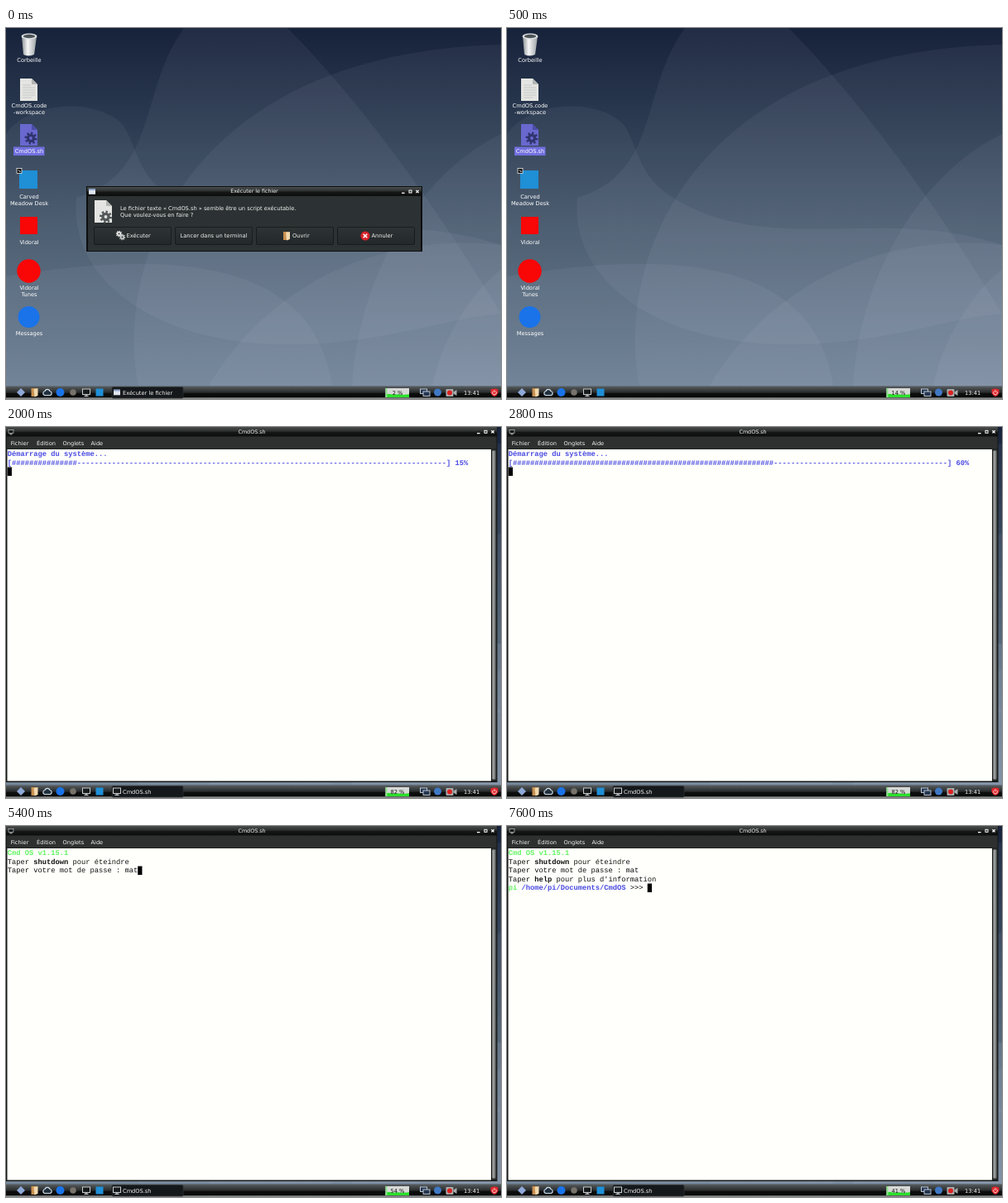
These frames come from a looping animation (598 px wide and 448 px high, 8000 ms). An HTML page:

```html
<!DOCTYPE html>
<html lang="fr">
<head>
<meta charset="utf-8">
<title>Terminal</title>
<style>
html, body { margin: 0; width: 100%; height: 100%; overflow: hidden; background: #1b2540; }
svg { display: block; width: 598px; height: 448px; }
text { font: 6.65px "DejaVu Sans", sans-serif; fill: #f4f4f4; text-rendering: geometricPrecision; white-space: pre; }
.mid { text-anchor: middle; }
.title { font-size: 6.35px; }
.label { text-anchor: middle; fill: #fff; }
#lines text { font: 8.75px "Liberation Mono", monospace; fill: #111; }
#lines .b { font-weight: bold; }
#lines .blue { font-weight: bold; fill: #4a4ae4; }
#lines .green { font-weight: bold; fill: #62f562; }
.waves path { fill: #dfe9ee; fill-opacity: .05; }
.btn { fill: url(#btn); stroke: #171a1b; stroke-width: .9; }
.btn.down { fill: #191d1f; }
</style>
</head>
<body>
<svg viewBox="0 0 598 448">
  <defs>
    <linearGradient id="sky" x2="0" y2="1">
      <stop offset="0" stop-color="#17223b"/>
      <stop offset=".25" stop-color="#2b3a50"/>
      <stop offset=".55" stop-color="#46586b"/>
      <stop offset="1" stop-color="#677b8f"/>
    </linearGradient>
    <linearGradient id="bar" x2="0" y2="1">
      <stop offset="0" stop-color="#5f6466"/>
      <stop offset=".12" stop-color="#4c5052"/>
      <stop offset=".5" stop-color="#282a2b"/>
      <stop offset=".55" stop-color="#0d0e0e"/>
      <stop offset=".85" stop-color="#0a0a0a"/>
      <stop offset=".92" stop-color="#7f8282"/>
      <stop offset="1" stop-color="#8c8f8f"/>
    </linearGradient>
    <linearGradient id="head" x2="0" y2="1">
      <stop offset="0" stop-color="#4b4f4e"/>
      <stop offset=".45" stop-color="#2b2e2d"/>
      <stop offset=".55" stop-color="#151716"/>
      <stop offset="1" stop-color="#0c0d0d"/>
    </linearGradient>
    <linearGradient id="btn" x2="0" y2="1">
      <stop offset="0" stop-color="#2e3435"/>
      <stop offset="1" stop-color="#23282a"/>
    </linearGradient>
    <linearGradient id="can">
      <stop offset="0" stop-color="#8d9296"/>
      <stop offset=".4" stop-color="#f6f7f7"/>
      <stop offset="1" stop-color="#9ba0a4"/>
    </linearGradient>
    <linearGradient id="thumb">
      <stop offset="0" stop-color="#b0b3b2"/>
      <stop offset="1" stop-color="#6c7070"/>
    </linearGradient>
    <g id="doc">
      <path d="M0 0H14L21 7V27H0Z" fill="#e4e5e2"/>
      <path d="M14 0V7H21Z" fill="#b3b5b1"/>
    </g>
    <g id="gear">
      <circle r="3.6" fill="none" stroke="currentColor" stroke-width="3.4"/>
      <circle r="6" fill="none" stroke="currentColor" stroke-width="3" pathLength="16" stroke-dasharray="1"/>
    </g>
    <g id="screen">
      <rect x="-4.500" y="-4" width="9" height="6.500" fill="#181b1c" stroke="#c9cdce"/>
      <path d="M-2.500 4.300H2.500M0 3V4.500" stroke="#c9cdce" stroke-width="1.200"/>
    </g>
    <g id="folder">
      <path d="M-4-5H2V5H-4Z" fill="#c9904f"/>
      <path d="M-1-4L4-5V4L0 5.500Z" fill="#f1d9ae"/>
    </g>
    <g id="win">
      <rect x="-4" y="-3.300" width="8" height="6.600" fill="#dfe5ee"/>
      <rect x="-4" y="-3.300" width="8" height="1.800" fill="#8fa4cf"/>
    </g>
    <g id="ctl" fill="none" stroke="#fff">
      <path d="M-19 1.800h3.600" stroke-width="1.300"/>
      <rect x="-10" y="-1.500" width="3" height="3"/>
      <path d="M-1.600-1.600l3.200 3.200M1.600-1.600l-3.200 3.200" stroke-width="1.300"/>
    </g>
  </defs>

  <rect width="598" height="448" fill="url(#sky)"/>
  <g class="waves">
    <path d="M160 432C130 290 215 30 598 20V432Z"/>
    <path d="M215 0C160 75 185 175 85 205C75 310 190 380 330 382C450 384 530 350 598 345C550 265 450 110 340 0Z"/>
    <path d="M0 128C30 85 115 85 142 118C165 155 155 195 250 228C360 262 470 220 598 262V432H0Z"/>
    <path d="M418 432C425 300 500 175 598 128V432Z"/>
    <path d="M245 432C310 320 440 245 598 262V432Z"/>
    <path d="M0 300C180 270 370 270 394 432H0Z"/>
    <path d="M515 432C525 380 560 320 598 292V432Z"/>
  </g>

  <g id="icons">
    <path d="M19 10L21 32Q27 35 34 32L37 10Z" fill="url(#can)"/>
    <ellipse cx="28" cy="10" rx="9.500" ry="3.600" fill="#dcdfe1"/>
    <ellipse cx="28" cy="10" rx="7.200" ry="2.200" fill="#4d5357"/>
    <use href="#doc" x="17" y="61"/>
    <path d="M20 69h10M20 72h15M20 75h15M20 78h15M20 81h15M20 84h11" stroke="#bfc1be" stroke-width=".8"/>
    <path d="M17 116H31L38 123V142H17Z" fill="#6968cf"/>
    <path d="M31 116V123H38Z" fill="#4b4ca5"/>
    <use href="#gear" x="30" y="133" color="#30356f"/>
    <rect x="9" y="143.500" width="37.500" height="10.500" fill="#7270df"/>
    <rect x="16" y="172" width="22" height="22" fill="#1f8fd6"/>
    <rect x="13" y="169.500" width="6" height="6" fill="#111" stroke="#fff" stroke-width=".7"/>
    <path d="M15 171.500l2.500 2.500" stroke="#fff"/>
    <rect x="17" y="228" width="21" height="21" fill="#f90606"/>
    <circle cx="27.500" cy="293.500" r="14.200" fill="#f90606"/>
    <circle cx="27.500" cy="349" r="13" fill="#1a73e8"/>
  </g>

  <g id="dialog">
    <rect x="97" y="191" width="406" height="79" fill="#0d0f0f"/>
    <rect x="98" y="192" width="404" height="11" fill="url(#head)"/>
    <rect x="99" y="203" width="402" height="66" fill="#2c3233"/>
    <use href="#win" x="104" y="197.500"/>
    <text class="mid title" x="300" y="199.400">Exécuter le fichier</text>
    <use href="#ctl" x="497" y="197.500"/>
    <use href="#doc" x="107" y="208"/>
    <use href="#gear" x="120.500" y="228" color="#55595a"/>
    <text x="138" y="220.200">Le fichier texte « CmdOS.sh » semble être un script exécutable.</text>
    <text x="138" y="228.300">Que voulez-vous en faire ?</text>
    <rect class="btn" x="106.500" y="240.500" width="93" height="21" rx="1.500"/>
    <rect class="btn" id="launch" x="204.500" y="240.500" width="93" height="21" rx="1.500"/>
    <rect class="btn" x="302.500" y="240.500" width="93" height="21" rx="1.500"/>
    <rect class="btn" x="400.500" y="240.500" width="93" height="21" rx="1.500"/>
    <use href="#gear" color="#e8e8e8" transform="translate(136.500 248.500) scale(.5)"/>
    <use href="#gear" color="#c4c7c8" transform="translate(140.500 252.500) scale(.5)"/>
    <text x="145.500" y="253.300">Exécuter</text>
    <text class="mid" x="251" y="253.300">Lancer dans un terminal</text>
    <use href="#folder" x="339" y="251"/>
    <text x="346" y="253.300">Ouvrir</text>
    <circle cx="434" cy="251" r="5.600" fill="#d8232a"/>
    <path d="M431.700 248.700l4.600 4.600M436.300 248.700l-4.600 4.600" stroke="#fff" stroke-width="1.600"/>
    <text x="441.500" y="253.300">Annuler</text>
  </g>

  <g id="term">
    <rect width="593.500" height="429" fill="#131615"/>
    <rect width="593" height="11.500" fill="url(#head)"/>
    <rect x="1" y="11.500" width="591.500" height="15" fill="#2d302f"/>
    <use href="#screen" transform="translate(6 6) scale(.66)"/>
    <text class="mid title" x="297" y="7.900">CmdOS.sh</text>
    <use href="#ctl" x="588" y="5.800"/>
    <text x="5.700" y="21.700">Fichier</text>
    <text x="37" y="21.700">Édition</text>
    <text x="68.500" y="21.700">Onglets</text>
    <text x="102.500" y="21.700">Aide</text>
    <rect x="1.500" y="27" width="584.500" height="400.500" fill="#fffffb"/>
    <rect x="586.500" y="27" width="6" height="400.500" fill="#2a2d2c"/>
    <rect x="587.500" y="28.500" width="4" height="397" rx="1" fill="url(#thumb)"/>
    <g id="lines"></g>
    <rect id="caret" width="5.250" height="10.500" fill="#000"/>
  </g>

  <g id="panel">
    <rect y="432.500" width="598" height="15.500" fill="url(#bar)"/>
    <path d="M18 435l5 5-5 5-5-5Z" fill="#8fa9d8"/>
    <use href="#folder" x="34.500" y="440"/>
    <path d="M46.500 443.500a2.600 2.600 0 0 1 .5-5a3.200 3.200 0 0 1 6 0a2.600 2.600 0 0 1 .5 5Z" fill="#22303c" stroke="#cfe0ec" stroke-width="1.200"/>
    <circle cx="65.500" cy="440" r="5" fill="#1a73e8"/>
    <circle cx="81" cy="440" r="3.800" fill="#77736a"/>
    <use href="#screen" x="97" y="440"/>
    <rect x="108.500" y="435.500" width="9" height="9" fill="#1f8fd6"/>
    <g id="task">
      <rect x="128" y="433.500" width="86" height="13.500" rx="1.500" fill="#15181b" stroke="#303436" stroke-width=".7"/>
      <use id="taskIcon" x="134" y="440"/>
      <text id="taskName" x="141" y="442.700"></text>
    </g>
    <rect x="458.500" y="435" width="28.500" height="11" fill="#d6d9d6"/>
    <path d="M458.500 446V442.500l4-.7 5 1 6-.5 5 .6 8.500-.7V446Z" fill="#2be02b"/>
    <rect x="458.500" y="435" width="2" height="11" fill="#8de08d"/>
    <text id="load" class="mid" x="473" y="442.800" style="fill:#111"></text>
    <g fill="#27364f" stroke="#c6d3e2" stroke-width=".9">
      <rect x="500.500" y="436" width="8" height="5.500"/>
      <rect x="504" y="439" width="8" height="5.500"/>
    </g>
    <circle cx="521.500" cy="440" r="4.500" fill="#3f78c4"/>
    <rect x="531.500" y="436" width="9" height="9" rx="1" fill="#a9adad"/>
    <path d="M540.500 439.500l4-2.500v7l-4-2.500Z" fill="#a9adad"/>
    <circle cx="536" cy="440.500" r="3" fill="#dc2222"/>
    <text x="553" y="442.800">13:41</text>
    <path d="M585.500 436.500q4.500-2 9 0v4.500q-1.500 3-4.500 4q-3-1-4.500-4Z" fill="#e0262c"/>
    <path d="M588.300 438.700a2.400 2.400 0 1 0 3.400 0M590 437v3" fill="none" stroke="#fff" stroke-width=".8"/>
  </g>
</svg>
<script>
const LOOP = 8000, CELL = 5.25, ROW = 10.5;
const $ = id => document.getElementById(id);
const show = (id, on) => { $(id).style.display = on ? "" : "none"; };

// Each entry: [start in ms, value]
const LOAD = [[0, 2], [500, 14], [2000, 82], [3200, 65], [4700, 54], [6700, 48], [7100, 45], [7600, 41]];
const BOOT = [[1700, 5], [1900, 10], [2000, 15], [2100, 20], [2300, 35], [2800, 60], [3200, 75], [3500, 95]];
const TYPED = [[4100, ""], [4700, "m"], [5400, "mat"]];

const at = (steps, t) => steps.filter(s => s[0] <= t).pop()?.[1];
const span = (cls, s) => `<tspan class="${cls}">${s}</tspan>`;

const labels = [
  [41.4, "Corbeille"], [96.2, "CmdOS.code"], [104.2, "-workspace"], [151.2, "CmdOS.sh"],
  [206.2, "Carved"], [214.2, "Meadow Desk"], [261, "Vidoral"], [316, "Vidoral"],
  [324, "Tunes"], [371.2, "Messages"]
];
$("icons").insertAdjacentHTML("beforeend",
  labels.map(([y, s]) => `<text class="label" x="28" y="${y}">${s}</text>`).join(""));

// Returns the lines on screen, the caret column and, if not below them, its row
function screen(t) {
  if (t < 1700 || (t >= 3900 && t < 4100)) return [[], 0];
  if (t < 3900) {
    const n = at(BOOT, t);
    const bar = "[" + "#".repeat(n) + "-".repeat(100 - n) + "] " + n + "%";
    return [[span("blue", "Démarrage du système..."), span("blue", bar)], 0];
  }
  const ask = "Taper votre mot de passe : " + at(TYPED, t);
  const lines = [
    span("green", "Cmd OS v1.15.1"),
    "Taper " + span("b", "shutdown") + " pour éteindre",
    ask
  ];
  if (t < 6700) return [lines, ask.length, 2];
  if (t < 6800) return [lines, 0];
  lines.push(
    "Taper " + span("b", "help") + " pour plus d'information",
    span("green", "pi") + " " + span("blue", "/home/pi/Documents/CmdOS") + " &gt;&gt;&gt; "
  );
  return [lines, 32, 4];
}

let last = "";
function draw(t) {
  show("dialog", t < 200);
  $("launch").classList.toggle("down", t >= 100);
  show("term", t >= 1100);
  show("task", t < 500 || t >= 1100);
  $("taskIcon").setAttribute("href", t < 500 ? "#win" : "#screen");
  $("taskName").textContent = t < 500 ? "Exécuter le fichier" : "CmdOS.sh";
  $("load").textContent = at(LOAD, t) + " %";

  const [lines, col, row = lines.length] = screen(t);
  const html = lines.map((s, i) =>
    `<text x="1.7" y="${35.2 + i * ROW}">${s}</text>`).join("");
  if (html !== last) $("lines").innerHTML = last = html;
  $("caret").setAttribute("x", 1.7 + col * CELL);
  $("caret").setAttribute("y", 27.5 + row * ROW);
}

const start = performance.now();
function tick() {
  draw((performance.now() - start) % LOOP);
  requestAnimationFrame(tick);
}
tick();
</script>
</body>
</html>
```
